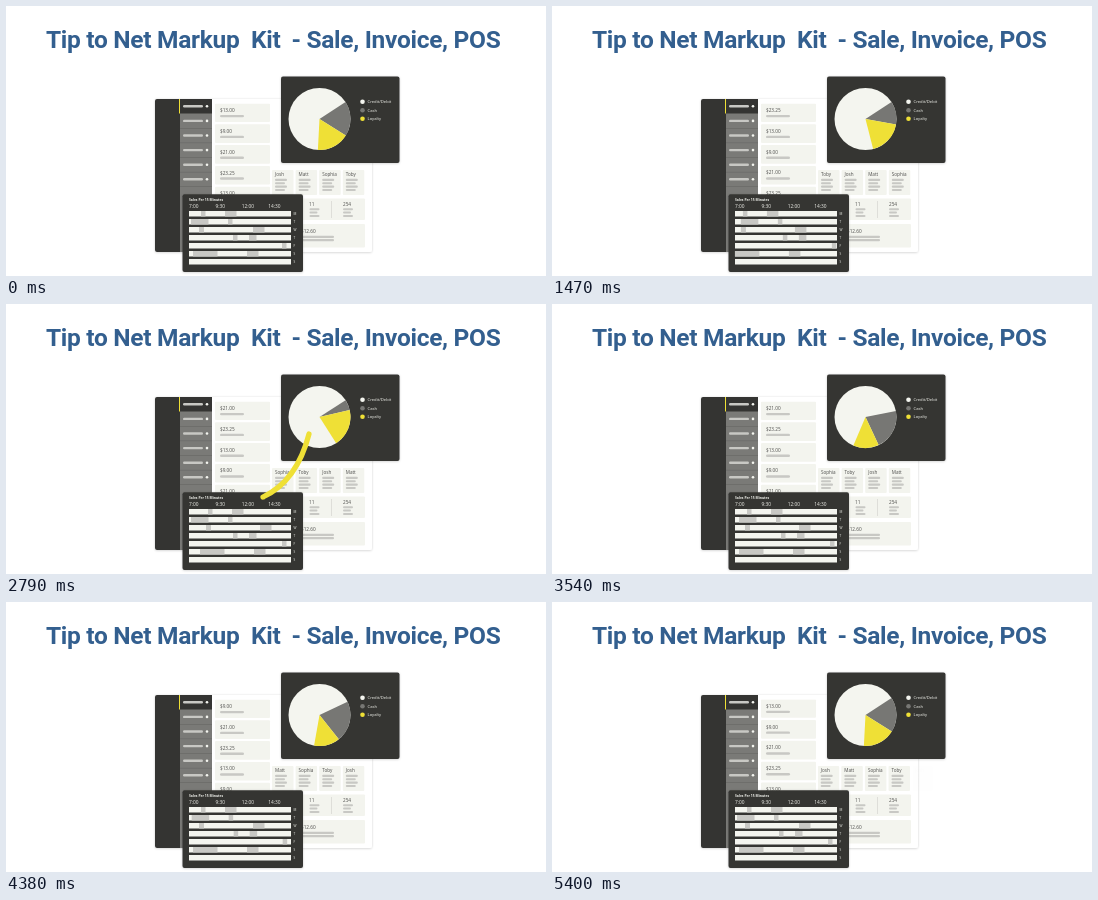
These frames come from a looping animation (540 by 270 pixels, 5430 ms). An HTML page:

```html
<!DOCTYPE html>
<html lang="en">
<head>
<meta charset="utf-8">
<title>Margin dashboard</title>
<style>
  html, body { margin: 0; width: 100%; height: 100%; overflow: hidden; background: #fff; }
  svg { display: block; width: 100vw; height: 100vh; }
  text { font-family: "Open Sans", sans-serif; white-space: pre; }
  .title { font: 700 24.5px Roboto, sans-serif; letter-spacing: -.3px; fill: #335f8f; }
  .dark { fill: #343432; }
  .card { fill: #f3f4ee; }
  .mute { fill: #c8c8c4; }
  .ink { fill: #4c4c4a; font-size: 4.7px; }
  .lit { fill: #f4f5ef; }
</style>
</head>
<body>
<svg viewBox="0 0 540 270">
  <defs>
    <filter id="soft" x="-10%" y="-10%" width="120%" height="120%">
      <feDropShadow dx="0" dy="0.5" stdDeviation="1" flood-color="#000" flood-opacity=".2"/>
    </filter>
    <clipPath id="priceClip"><rect x="207" y="97.5" width="59" height="148"/></clipPath>
    <clipPath id="nameClip"><rect x="266" y="160" width="120" height="30"/></clipPath>
  </defs>
  <rect width="540" height="270" fill="#fff"/>
  <text class="title" x="40" y="41.7">Tip to Net Markup  Kit</text>
  <text class="title" x="285.5" y="41.7">- Sale, Invoice, POS</text>

  <rect x="149" y="93" width="217" height="153" rx="2" fill="#fff" filter="url(#soft)"/>
  <path class="dark" d="M151 93H206V246H151Q149 246 149 244V95Q149 93 151 93Z"/>
  <rect x="174" y="107.5" width="32" height="138.5" fill="#7a7a77"/>
  <rect x="173" y="93" width="1" height="14.5" fill="#efe036"/>
  <g id="menu"></g>
  <g clip-path="url(#priceClip)"><g id="prices"></g></g>
  <g clip-path="url(#nameClip)"><g id="names"></g></g>
  <g id="stats"></g>

  <rect class="dark" x="275" y="70.5" width="118.5" height="86.5" rx="2" filter="url(#soft)"/>
  <circle cx="313.5" cy="113" r="31" fill="#f4f5ef"/>
  <path id="cash" fill="#777774"/>
  <path id="loyal" fill="#efe036"/>
  <g id="legend"></g>

  <rect class="dark" x="176.5" y="188.3" width="120.5" height="77.7" rx="2" filter="url(#soft)"/>
  <g id="chart"></g>
  <path id="swoosh" d="M257 193Q291 177 303 130" fill="none" stroke="#efe036" stroke-width="5.2" stroke-linecap="round"/>
</svg>
<script>
const LOOP = 5430;
const STARTS = [-240, 1140, 2520, 3780, 5190];
const $ = id => document.getElementById(id);

function add(parent, tag, attrs, text) {
  const el = document.createElementNS("http://www.w3.org/2000/svg", tag);
  for (const k in attrs) el.setAttribute(k, attrs[k]);
  if (text) el.textContent = text;
  parent.appendChild(el);
  return el;
}
const box = (p, cls, x, y, width, height, rx = 0) =>
  add(p, "rect", { class: cls, x, y, width, height, rx });
const label = (p, cls, x, y, text, size) =>
  add(p, "text", { class: cls, x, y, style: size ? `font-size:${size}px` : "" }, text);

// Sidebar
for (let i = 0; i < 6; i++) {
  const y = 100.3 + i * 14.6;
  if (i) box($("menu"), "dark", 174, y + 7.2, 32, .4).style.opacity = .4;
  box($("menu"), "mute", 177, y - 1.2, 20, 2.4, 1.2);
  add($("menu"), "circle", { class: "lit", cx: 201, cy: y, r: 1.3 });
}

// Endless strips: neighbours on both sides keep the window filled
const PRICE_STEP = 20.8, NAME_STEP = 23.6;
const PRICES = ["$13.00", "$9.00", "$21.00", "$23.25"];
const NAMES = ["Josh", "Matt", "Sophia", "Toby"];
const nameCards = [];
for (let i = -6; i < 6; i++) {
  const k = (i + 8) % 4;
  const y = 97.5 + i * PRICE_STEP, x = 266 + i * NAME_STEP;
  box($("prices"), "card", 209, y, 55, 18.6, 1);
  label($("prices"), "ink", 214, y + 8.6, PRICES[k]);
  box($("prices"), "mute", 214, y + 11.4, 24, 2.4, 1.2);

  const el = add($("names"), "g", {});
  nameCards.push({ i, el });
  box(el, "card", x, 164, 21.5, 25, 1);
  label(el, "ink", x + 3, 170.4, NAMES[k], 4.6);
  for (let j = 0; j < 4; j++)
    box(el, "mute", x + 3, 172.8 + j * 3.4, j % 2 ? 10 : 12, 2.1, 1);
}

// Totals
const stats = $("stats");
box(stats, "card", 266, 192.5, 93, 21.5, 1);
label(stats, "ink", 303, 200, "11");
label(stats, "ink", 337, 200, "254");
box(stats, "mute", 325, 195, .5, 17);
for (const x of [303.5, 337])
  for (let j = 0; j < 3; j++) box(stats, "mute", x, 202.3 + j * 3.3, j % 2 ? 8 : 10, 2, 1);
box(stats, "card", 266, 218, 93, 23.5, 1);
label(stats, "ink", 295, 226.6, "$12.60");
for (const y of [229.8, 233]) box(stats, "mute", 293, y, 35, 2.2, 1);

// Pie legend
[["Credit/Debit", "#f4f5ef"], ["Cash", "#777774"], ["Loyalty", "#efe036"]].forEach(([name, fill], i) => {
  const y = 95.8 + i * 8.5;
  add($("legend"), "circle", { cx: 356.5, cy: y, r: 2.3, fill });
  label($("legend"), "lit", 361.5, y + 1.5, name, 4.2);
});

// Schedule: [row, x, width] of each shaded span
const chart = $("chart");
const rowY = row => 205 + row * 8;
label(chart, "lit", 183, 195.3, "Sales Per 15 Minutes", 3.35).style.fontWeight = 700;
["7:00", "9:30", "12:00", "14:30"].forEach((s, i) => label(chart, "lit", 183 + i * 26.4, 202, s, 4.8));
[..."MTWTFSS"].forEach((day, i) => {
  box(chart, "lit", 183, rowY(i), 102, 5.5);
  label(chart, "lit", 287.5, rowY(i) + 3.6, day, 3.2);
});
const SPANS = [
  [0, 195, 4.5], [0, 219, 11.5], [1, 185, 17.5], [1, 222, 4.5],
  [2, 193, 5], [2, 247, 11.5], [3, 227, 4.5], [3, 243, 7.5],
  [4, 276, 4.5], [5, 187, 24.5], [5, 241, 11.5]
];
const sets = [add(chart, "g", {}), add(chart, "g", {})];
for (const [row, x, w] of SPANS)
  box(sets[row === 1 || row === 3 || row === 4 ? 1 : 0], "mute", x, rowY(row), w, 5.5);

// Motion
const clamp = v => Math.max(0, Math.min(1, v));
const ramp = (t, from, to) => clamp((t - from) / (to - from));
const smooth = v => v * v * (3 - 2 * v);

// Cubic Bezier (.25, .1) (.25, 1)
function ease(x) {
  if (x <= 0 || x >= 1) return clamp(x);
  const at = (u, a, b) => 3 * a * u * (1 - u) ** 2 + 3 * b * u * u * (1 - u) + u ** 3;
  let lo = 0, hi = 1;
  for (let i = 0; i < 20; i++) {
    const mid = (lo + hi) / 2;
    if (at(mid, .25, .25) < x) lo = mid; else hi = mid;
  }
  return at(lo, .1, 1);
}

// Steps through the values, one per beat
function chain(t, values, from, to) {
  let v = values[values.length - 1];
  values.forEach((next, i) => {
    v += (next - v) * smooth(ramp(t, STARTS[i] + from, STARTS[i] + to));
  });
  return v;
}

function wedge(a, b) {
  const pt = d => {
    const r = d * Math.PI / 180;
    return (313.5 + 31 * Math.cos(r)).toFixed(2) + " " + (113 + 31 * Math.sin(r)).toFixed(2);
  };
  return `M313.5 113L${pt(a)}A31 31 0 0 1 ${pt(b)}Z`;
}

const swoosh = $("swoosh");
const len = swoosh.getTotalLength();

function draw(t) {
  let shift = 0;
  for (const s of STARTS.slice(1)) shift += ease(ramp(t, s - 20, s + 250));
  $("prices").setAttribute("transform", `translate(0 ${shift * PRICE_STEP})`);
  $("names").setAttribute("transform", `translate(${shift * NAME_STEP} 0)`);
  // Cards fade as they leave the fourth slot
  for (const { i, el } of nameCards) el.style.opacity = clamp(4 - i - shift);

  const a = chain(t, [-33, -33, -11, -33], 240, 840);
  const b = chain(t, [10, -13, 65, 32], 390, 870);
  const c = chain(t, [77, 57, 113, 93], 240, 840);
  $("cash").setAttribute("d", wedge(a, b));
  $("loyal").setAttribute("d", wedge(b, c));

  [[-4.5, 7, 0, 0], [4, 0, 2, 0]].forEach((v, i) =>
    sets[i].setAttribute("transform", `translate(${chain(t, v, 270, 810)} 0)`));

  const head = smooth(ramp(t, 2660, 2790)) * len;
  const tail = smooth(ramp(t, 2800, 2940)) * len;
  swoosh.style.display = head - tail > .5 ? "" : "none";
  swoosh.setAttribute("stroke-dasharray", `0 ${tail} ${head - tail} ${len * 2}`);
}

function tick(now) {
  draw(now % LOOP);
  requestAnimationFrame(tick);
}
draw(0);
requestAnimationFrame(tick);
</script>
</body>
</html>
```
